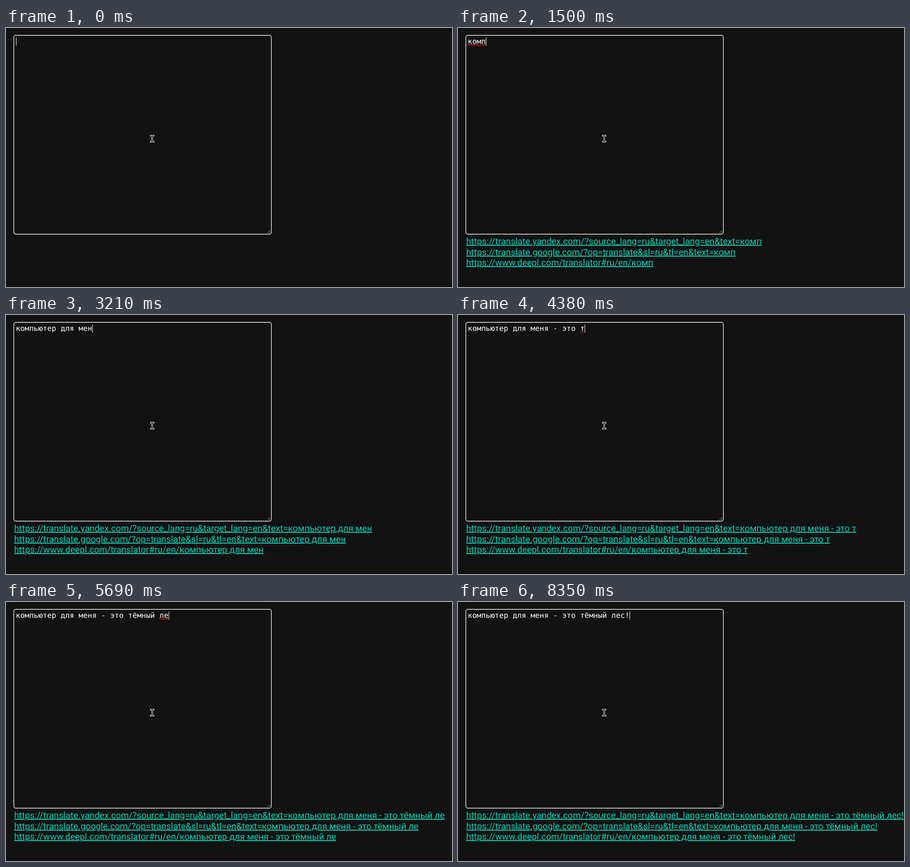
These frames come from a looping animation (981x571 px, 8.45 s). An HTML page with a canvas:

```html
<!DOCTYPE html>
<html lang="ru">
<head>
<meta charset="utf-8">
<title>Typing</title>
<style>
  html, body { margin: 0; width: 100%; height: 100%; overflow: hidden; background: #121212; }
  canvas { position: absolute; left: 0; top: 0; }
  div { position: absolute; white-space: nowrap; text-rendering: geometricPrecision; }
  #field { left: 21.5px; top: 20px; font: 16.42px/19px "DejaVu Sans Mono", monospace; color: #fff; }
  .link { left: 18px; font: 19.715px/23px Roboto, sans-serif; color: #08d2b8; text-decoration: underline 2px; }
</style>
</head>
<body>
<canvas id="stage" width="981" height="571"></canvas>
<div id="field"></div>
<div class="link" style="top:459px"></div>
<div class="link" style="top:483px"></div>
<div class="link" style="top:506px"></div>
<script>
const LOOP = 8450;
const PHRASE = 'компьютер для меня - это тёмный лес!';
const URLS = [
  'https://translate.yandex.com/?source_lang=ru&target_lang=en&text=',
  'https://translate.google.com/?op=translate&sl=ru&tl=en&text=',
  'https://www.deepl.com/translator#ru/en/'
];
const KNOWN = new Set(['', '-', 'к', 'компьютер', 'для', 'мен', 'меня', 'это', 'тём', 'тёмны', 'тёмный', 'лес', 'лес!']);
// [characters typed, time in ms], linear in between
const PACE = [[1, 980], [6, 1760], [7, 1880], [8, 2100], [9, 2280], [13, 2690], [14, 2790], [17, 3200],
  [19, 3560], [20, 3730], [26, 4360], [27, 4470], [28, 4660], [33, 5470], [34, 5590], [36, 5840]];
const BLINKS = [[450, 980], [6570, 7170], [7770, 8350]];
const LEFT = 22, ADVANCE = 9.873;

const ctx = document.getElementById('stage').getContext('2d');
const field = document.getElementById('field');
const links = document.querySelectorAll('.link');

function typedCount(t) {
  if (t < PACE[0][1]) return 0;
  for (let i = 1; i < PACE.length; i++) {
    const [n0, t0] = PACE[i - 1], [n1, t1] = PACE[i];
    if (t < t1) return Math.floor(n0 + (n1 - n0) * (t - t0) / (t1 - t0));
  }
  return PHRASE.length;
}

function line(points, color, width) {
  ctx.beginPath();
  points.forEach(([x, y]) => ctx.lineTo(x, y));
  ctx.strokeStyle = color;
  ctx.lineWidth = width;
  ctx.stroke();
}

function drawBox() {
  ctx.beginPath();
  ctx.roundRect(17.3, 16.3, 566.3, 438.2, 4);
  ctx.strokeStyle = '#f4f4f4';
  ctx.lineWidth = 1.4;
  ctx.stroke();
  line([[575, 452], [581, 446]], '#a8a8a8', 1);
  line([[579, 452], [581.5, 449.5]], '#a8a8a8', 1);
}

function drawPointer() {
  const x = 321.6, y = 244;
  const serif = s => [[x - 3, y + 6.6 * s], [x - 1.2, y + 6.6 * s], [x, y + 5.6 * s],
    [x + 1.2, y + 6.6 * s], [x + 3, y + 6.6 * s]];
  ctx.lineCap = 'square';
  for (const [color, width] of [['#fff', 3.2], ['#000', 1.4]]) {
    line(serif(-1), color, width);
    line(serif(1), color, width);
    line([[x, y - 5.6], [x, y + 5.6]], color, width);
  }
  ctx.lineCap = 'butt';
}

function drawSquiggle(from, to) {
  const points = [];
  for (let x = from; x <= to; x += 0.5) points.push([x, 37.4 + Math.sin((x - LEFT) * Math.PI / 2)]);
  line(points, '#e01b1b', 1.2);
}

function draw(t) {
  const n = typedCount(t);
  const text = PHRASE.slice(0, n);
  if (field.textContent !== text) {
    field.textContent = text;
    links.forEach((link, i) => { link.textContent = n ? URLS[i] + text : ''; });
  }

  ctx.fillStyle = '#121212';
  ctx.fillRect(0, 0, 981, 571);
  ctx.fillStyle = '#0f0f0f';
  ctx.fillRect(0, 567, 981, 4);
  drawBox();
  drawPointer();

  const caret = LEFT + n * ADVANCE;
  const word = text.slice(text.lastIndexOf(' ') + 1);
  if (!KNOWN.has(word)) drawSquiggle(caret - word.length * ADVANCE, caret - 0.5);
  if (!BLINKS.some(([off, on]) => t >= off && t < on)) {
    ctx.fillStyle = '#fff';
    ctx.fillRect(caret, 21, 1, 18);
  }
}

const start = performance.now();
function frame() {
  draw((performance.now() - start) % LOOP);
  requestAnimationFrame(frame);
}
frame();
</script>
</body>
</html>
```
